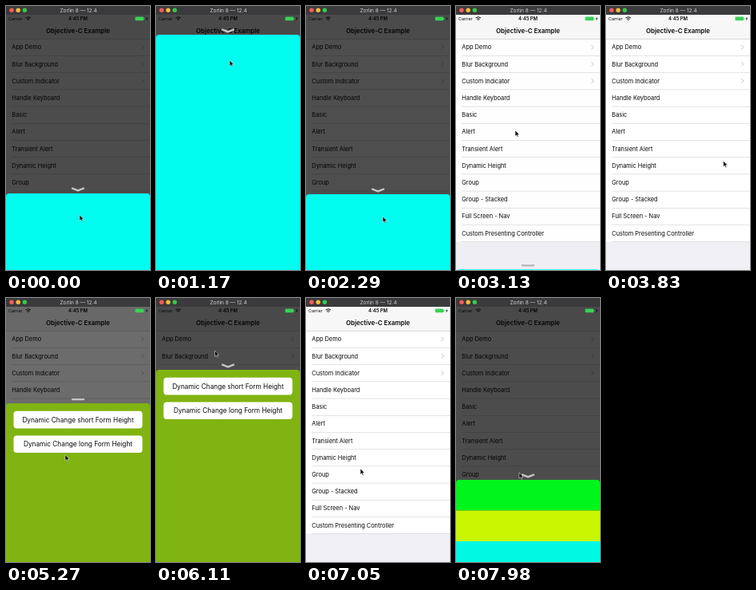
An HTML page for the animation above (8000 ms loop, 180 by 331 pixels).

```html
<!DOCTYPE html>
<html lang="en">
<head>
<meta charset="utf-8">
<title>Bottom sheet demo</title>
<style>
  html, body { margin: 0; width: 100%; height: 100%; overflow: hidden; background: #fff; }
  svg { display: block; width: 180px; height: 331px; }
  text { font-family: Inter, "Liberation Sans", sans-serif; fill: #0a0a0a; }
  .mid { text-anchor: middle; }
</style>
</head>
<body>
<svg id="stage" viewBox="0 0 180 331">
  <rect width="180" height="331" fill="#efeff4"/>
  <rect y="41" width="180" height="254.5" fill="#fff"/>
  <rect y="11" width="180" height="30" fill="#f7f7f7"/>
  <rect y="41" width="180" height=".5" fill="#b4b4b8"/>
  <g id="list"></g>
  <text x="3" y="18" font-size="5.4">Carrier</text>
  <g fill="none" stroke="#111" stroke-width="1">
    <path d="M24.6 14.9Q27.8 12.4 31 14.9M25.9 16.4Q27.8 14.9 29.7 16.4"/>
    <circle cx="27.8" cy="17.4" r=".3"/>
  </g>
  <text class="mid" x="90" y="18" font-size="5.9" font-weight="600">4:45 PM</text>
  <path d="M176.4 13.4L174.6 16.2H175.9L175.3 18.4L177.3 15.5H176Z" fill="#111"/>
  <text class="mid" x="90" y="33.8" font-size="7.85" font-weight="600">Objective-C Example</text>

  <rect id="dim" y="11" width="180" height="320" fill="#000"/>
  <rect x="161.5" y="13.6" width="10.5" height="4.6" rx="1" fill="#3ad156"/>
  <rect x="172.5" y="15" width=".8" height="1.8" fill="#3ad156"/>

  <g id="basic">
    <path d="M0 110V4Q0 0 4 0H176Q180 0 180 4V331H0Z" fill="#00fdf0"/>
  </g>
  <g id="dynamic">
    <path d="M0 110V4Q0 0 4 0H176Q180 0 180 4V331H0Z" fill="#80b412"/>
    <rect x="9.5" y="9.7" width="161" height="21.8" rx="4" fill="#fff"/>
    <rect x="9.5" y="40.5" width="161" height="21.5" rx="4" fill="#fff"/>
    <text class="mid" x="90" y="23.6" font-size="8.25">Dynamic Change short Form Height</text>
    <text class="mid" x="90" y="54.3" font-size="8.25">Dynamic Change long Form Height</text>
  </g>
  <g id="group">
    <path d="M0 38.5V4Q0 0 4 0H176Q180 0 180 4V38.5Z" fill="#00f51c"/>
    <rect y="38.5" width="180" height="38.5" fill="#c8f600"/>
    <rect y="77" width="180" height="60" fill="#00f9e2"/>
  </g>
  <path id="grip" fill="none" stroke="#c6c6c8" stroke-width="2.3" stroke-linecap="round" stroke-linejoin="round"/>

  <rect width="180" height="11" fill="#3b3a3c"/>
  <circle cx="7" cy="5.3" r="2.7" fill="#fc5b57"/>
  <circle cx="15.2" cy="5.3" r="2.7" fill="#f6be3c"/>
  <circle cx="23.4" cy="5.3" r="2.7" fill="#35c94a"/>
  <text class="mid" x="90.5" y="7.8" font-size="6.5" style="fill:#d2d2d2">Zorlin 8 — 12.4</text>
  <path id="cursor" d="M0 0V7.2L1.7 5.7L2.8 8.2L4 7.7L2.9 5.2H5.2Z" fill="#050505" stroke="#fff" stroke-width=".5"/>
</svg>
<script>
const LOOP = 8000, BOTTOM = 331, ROW = 21.2;
const $ = id => document.getElementById(id);
const clamp = x => Math.min(1, Math.max(0, x));
const smooth = u => u * u * (3 - 2 * u);
const out = u => 1 - (1 - u) ** 4;

const rows = ['App Demo', 'Blur Background', 'Custom Indicator', 'Handle Keyboard',
  'Basic', 'Alert', 'Transient Alert', 'Dynamic Height', 'Group', 'Group - Stacked',
  'Full Screen - Nav', 'Custom Presenting Controller'];

$('list').innerHTML = rows.map((name, i) => {
  const y = 51.6 + i * ROW;
  const arrow = i < 3
    ? `<path d="M169.3 ${y - 2.7}L172 ${y}L169.3 ${y + 2.7}" fill="none" stroke="#c4c4c8"/>` : '';
  return `<text x="7.3" y="${y + 2.7}" font-size="7.4">${name}</text>${arrow}
    <rect x="7" y="${y + 10.6}" width="173" height=".5" fill="#c8c7cc"/>`;
}).join('');

// keys: [time, ...values, easing into this key]
function track(keys, t) {
  let i = 1;
  while (i < keys.length - 1 && t > keys[i][0]) i++;
  const a = keys[i - 1], b = keys[i];
  const u = (b[3] || smooth)(clamp((t - a[0]) / (b[0] - a[0])));
  return [1, 2].map(k => a[k] + (b[k] - a[k]) * u);
}

// values: sheet top, grip bend
const sheets = [
  { id: 'basic', rest: 235, keys: [[0, 235, 1], [100, 235, 1], [300, 200, 0], [900, 36, 1],
    [1250, 36, 1], [1450, 70, 0], [2150, 236, 1], [2330, 236, 1], [2500, 235, 1],
    [2780, 235, 1], [3150, 331, 0]] },
  { id: 'dynamic', rest: 90, keys: [[5080, 331, 0], [5620, 90, 0, out], [5800, 90, 1],
    [6300, 90, 1], [6740, 331, 0]] },
  { id: 'group', rest: 228, keys: [[7130, 331, 0], [7700, 228, 0, out], [7900, 228, 1]] }
];

const pointer = [[0, 92, 262], [100, 92, 262], [900, 92, 68], [1250, 92, 68], [2150, 96, 264],
  [2330, 96, 264], [2750, 74, 156], [3350, 74, 156], [4150, 186, 215], [4600, 186, 215],
  [5000, 74, 197], [5250, 74, 197], [5750, 74, 144], [5900, 74, 144], [6100, 73.5, 66],
  [6350, 73.5, 66], [7000, 68, 214], [7250, 68, 214], [7940, 79, 219], [8000, 79, 219]];

function draw(t) {
  let shade = 0, grip = '';
  for (const s of sheets) {
    const [top, bend] = track(s.keys, t);
    const shown = top < BOTTOM - .05;
    $(s.id).style.display = shown ? '' : 'none';
    if (!shown) continue;
    $(s.id).setAttribute('transform', `translate(0 ${top})`);
    shade = Math.max(shade, clamp((BOTTOM - top) / (BOTTOM - s.rest)));
    const y = top - 5, d = 1.3 * bend;
    grip = `M83 ${y - d}L90 ${y + d}L97 ${y - d}`;
  }
  $('dim').setAttribute('opacity', .7 * shade);
  $('grip').setAttribute('d', grip);
  $('grip').setAttribute('stroke', shade < .1 ? '#b8b8bc' : '#c6c6c8');
  const [x, y] = track(pointer, t);
  $('cursor').setAttribute('transform', `translate(${x} ${y})`);
}

const start = performance.now();
function tick() {
  draw((performance.now() - start) % LOOP);
  requestAnimationFrame(tick);
}
draw(0);
requestAnimationFrame(tick);
</script>
</body>
</html>
```
